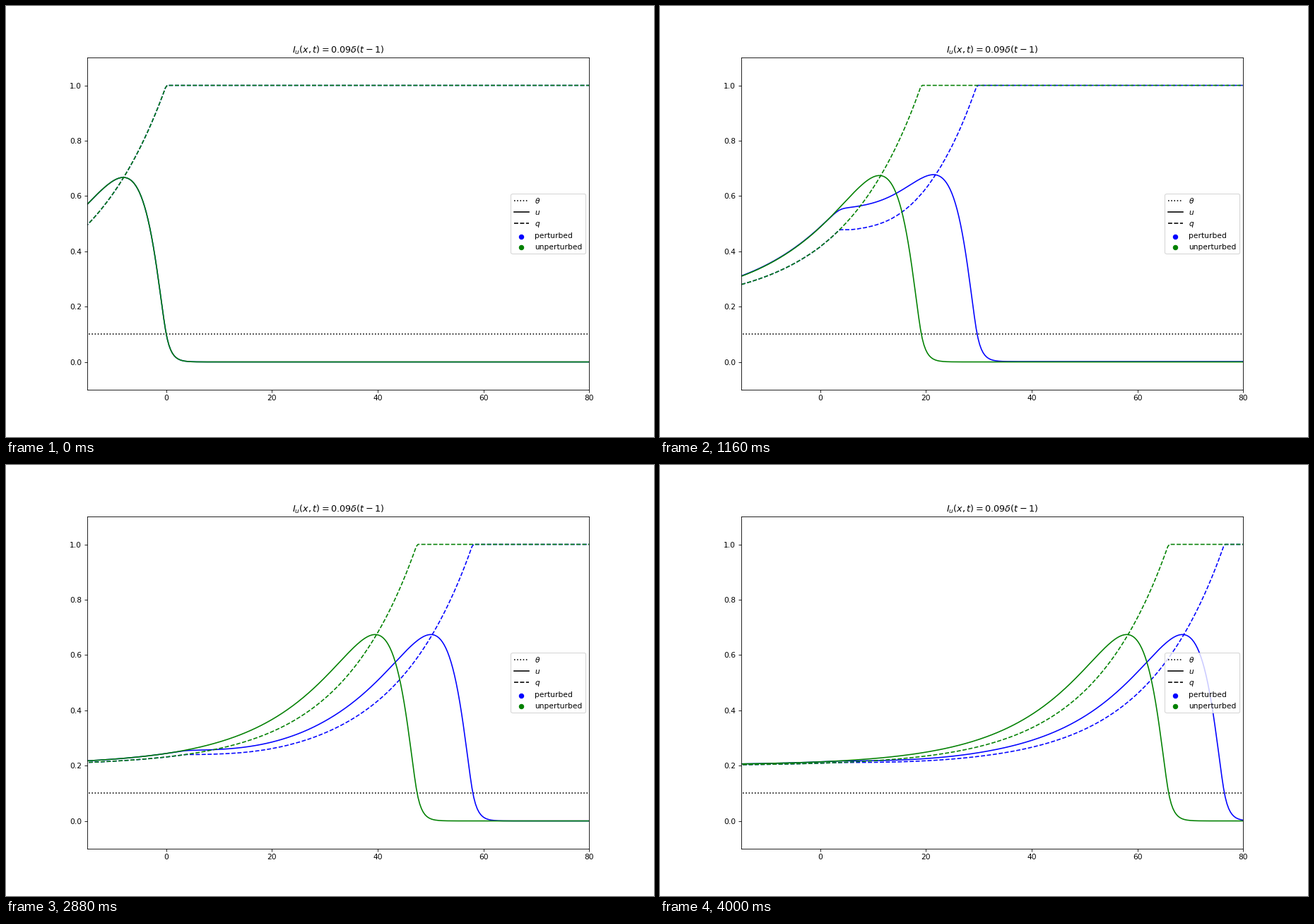
A matplotlib script for the animation above (4.04 s loop, 917x611 px).

```python
import numpy as np
import matplotlib.pyplot as plt
from matplotlib.animation import FuncAnimation

W, H, DPI = 917, 611, 76.4
FRAMES, INTERVAL = 101, 40

# Neural field with synaptic depression
THETA, KICK, KICK_TIME = 0.1, 0.09, 1.0
TAU_Q, BETA = 20.0, 4.0
DT, STEPS_PER_FRAME = 0.01, 18

x = np.linspace(-100, 100, 608)
dx = x[1] - x[0]
kernel = 0.5 * dx * np.exp(-np.abs(x[:, None] - x[None, :]))


def front_profile(xi):
    """Exact travelling front (u, q) with its threshold crossing at 0."""
    c, a, rest = 3.75, 1 / 15, 1 / (1 + BETA)
    gap = 1 - rest
    back = np.minimum(xi, 0)
    q = rest + gap * np.exp(a * back)
    near = -(rest / 2 + gap / 2 / (1 - a)) / (1 - c)
    far = gap / (1 - a * a) / (1 - a * c)
    decay = THETA - rest - near - far
    u = (rest + near * np.exp(back) + far * np.exp(a * back)
         + decay * np.exp(back / c))
    return np.where(xi > 0, THETA * np.exp(-np.maximum(xi, 0)), u), q


def simulate():
    """Euler steps; column 0 is perturbed, column 1 is not."""
    u0, q0 = front_profile(x)
    u = np.column_stack([u0, u0])
    q = np.column_stack([q0, q0])
    kick_step = round(KICK_TIME / DT)
    history = []
    for step in range((FRAMES - 1) * STEPS_PER_FRAME + 1):
        if step == kick_step:
            u[:, 0] += KICK
        if step % STEPS_PER_FRAME == 0:
            history.append((u.copy(), q.copy()))
        fired = q * (u >= THETA)
        du = kernel @ fired - u
        dq = (1 - q - BETA * fired) / TAU_Q
        u = u + DT * du
        q = q + DT * dq
    return history


history = simulate()

fig, ax = plt.subplots(figsize=(W / DPI + 1e-6, H / DPI + 1e-6), dpi=DPI)
ax.set_xlim(-15, 80)
ax.set_ylim(-0.1, 1.1)
ax.set_title(r"$I_u(x,t) = 0.09\delta(t-1)$")

ax.plot(x, np.full_like(x, THETA), "k:")
u_lines, q_lines = [], []
for color in ("blue", "green"):
    u_lines += ax.plot(x, x * 0, "-", color=color)
    q_lines += ax.plot(x, x * 0, "--", color=color)

for style, label in ((":", r"$\theta$"), ("-", "$u$"), ("--", "$q$")):
    ax.plot([], [], "k" + style, label=label)
for color, label in (("blue", "perturbed"), ("green", "unperturbed")):
    ax.scatter([], [], color=color, label=label)
ax.legend(loc="center right", labelspacing=0.55)


def update(frame):
    u, q = history[frame]
    for i in range(2):
        u_lines[i].set_ydata(u[:, i])
        q_lines[i].set_ydata(q[:, i])
    return u_lines + q_lines


anim = FuncAnimation(fig, update, frames=FRAMES, interval=INTERVAL,
                     init_func=lambda: update(0), repeat=True,
                     repeat_delay=0, blit=False)
plt.show()
```
